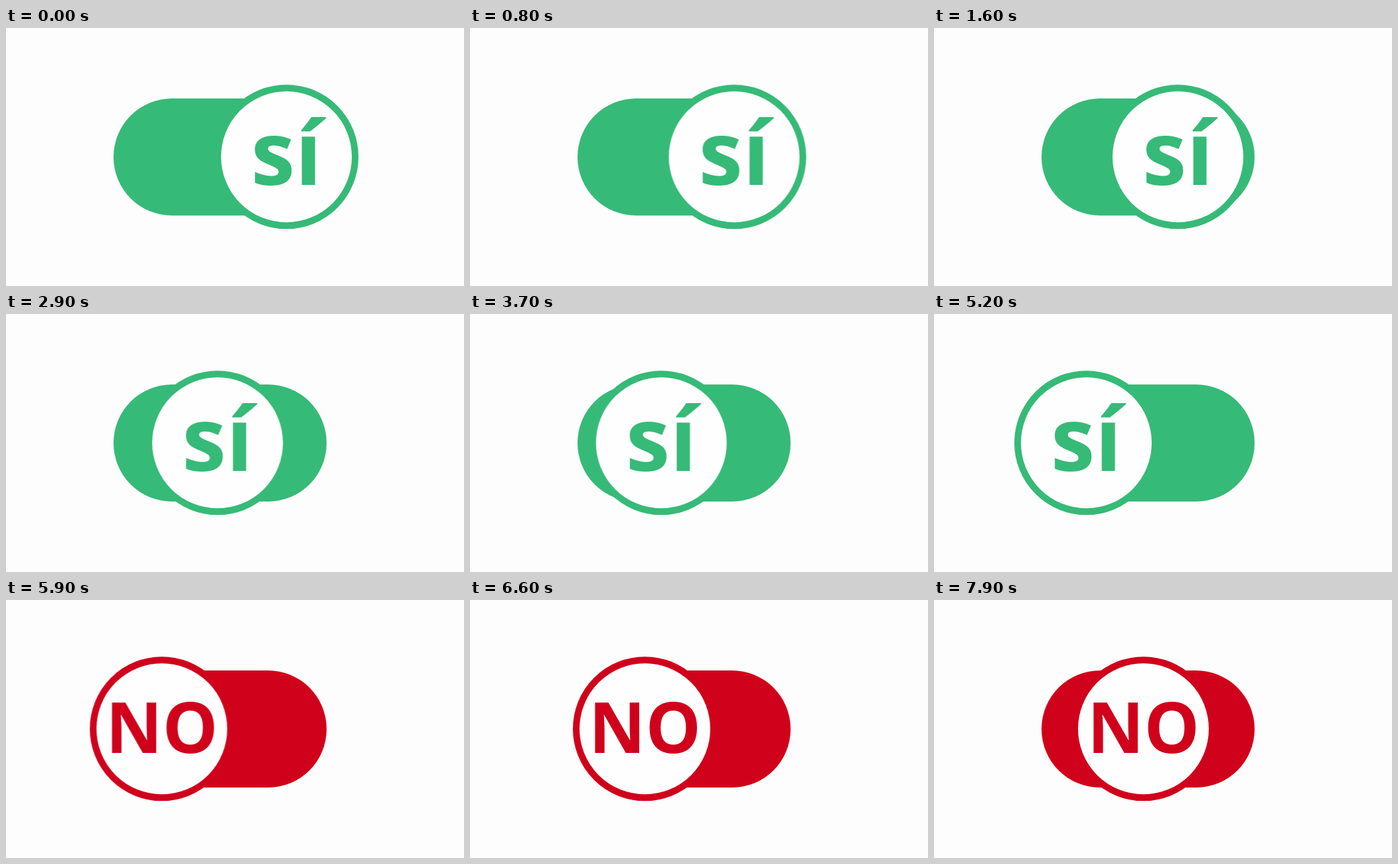
Recreate the animation shown at these times as an HTML page without scripts. Size 690 by 388 pixels, loop 8000 ms.

```html
<!DOCTYPE html>
<html lang="es">
<head>
<meta charset="utf-8">
<title>Sí / No</title>
<style>
html, body { margin: 0; width: 100%; height: 100%; overflow: hidden; background: #fdfdfd; }
svg { display: block; width: 690px; height: 388px; color: #36ba77; }
svg, .knob, .yes, .no { animation: 8s -4ms infinite step-end; }
svg { animation-name: tint; }
.knob { animation-name: slide; }
.yes { animation-name: hide; }
.no { animation-name: show; }
text { font-family: "Open Sans", "Noto Sans", sans-serif; font-weight: 700; text-anchor: middle; fill: currentColor; }
.yes { font-size: 133.5px; }
.no { font-size: 105px; }

@keyframes tint { 0% { color: #36ba77; } 68.75%, 100% { color: #d0021b; } }
@keyframes hide { 0% { visibility: visible; } 68.75%, 100% { visibility: hidden; } }
@keyframes show { 0% { visibility: hidden; } 68.75%, 100% { visibility: visible; } }

/* even travel, ten positions a second */
@keyframes slide {
  0% { transform: translate(422.5px, 193.75px); animation-timing-function: steps(2); }
  2.5% { transform: translate(420.8px, 193.75px); animation-timing-function: steps(14); }
  20% { transform: translate(367.5px, 193.75px); animation-timing-function: steps(13); }
  36.25% { transform: translate(318.7px, 193.75px); animation-timing-function: steps(8); }
  46.25% { transform: translate(288.2px, 193.75px); animation-timing-function: steps(15); }
  65% { transform: translate(229.5px, 193.75px); animation-timing-function: steps(2); }
  67.5% { transform: translate(222px, 193.75px); }
  70% { transform: translate(222.5px, 193.75px); animation-timing-function: steps(10); }
  82.5% { transform: translate(263.5px, 193.75px); animation-timing-function: steps(13); }
  98.75%, 100% { transform: translate(315.5px, 193.75px); }
}
</style>
</head>
<body>
<svg viewBox="0 0 690 388">
  <rect x="162" y="106" width="321" height="176" rx="88" fill="currentColor"/>
  <g class="knob">
    <circle r="103.5" fill="#fefefe" stroke="currentColor" stroke-width="10"/>
    <text class="yes" y="42">sí</text>
    <text class="no" y="36.5">NO</text>
  </g>
</svg>
</body>
</html>
```
